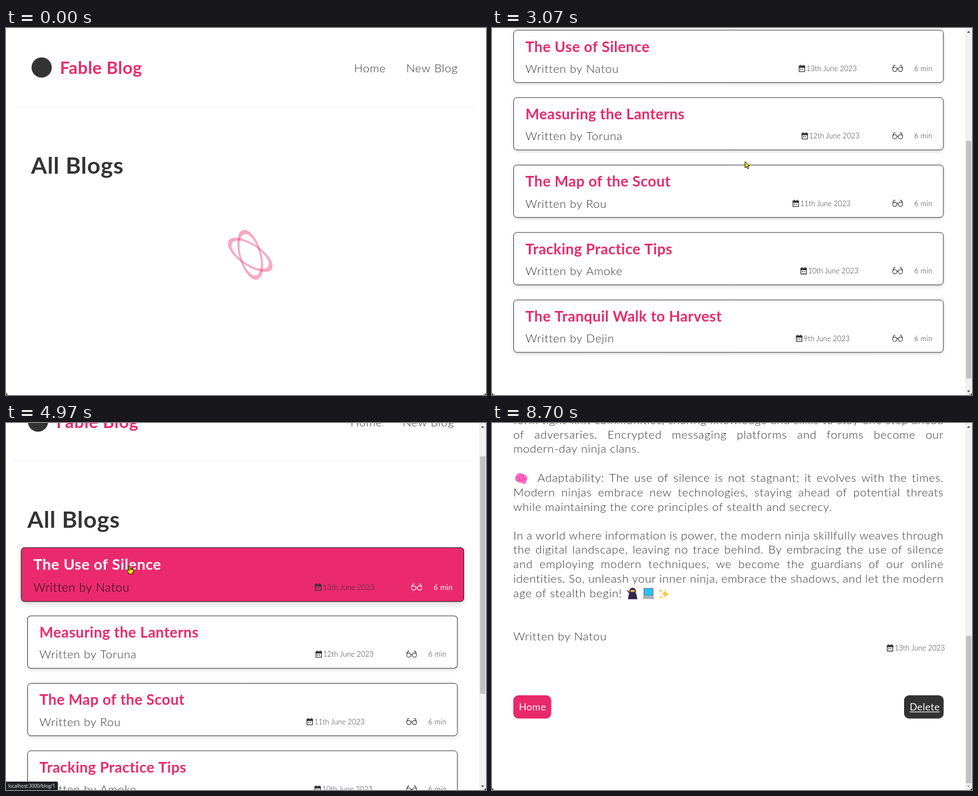
An HTML page with a canvas for the animation above (8810 ms loop, 855 by 655 pixels).

```html
<!DOCTYPE html>
<html lang="en">
<head>
<meta charset="utf-8">
<title>Blog</title>
<style>
  html, body { margin: 0; width: 100%; height: 100%; overflow: hidden; background: #fff; }
  canvas { display: block; width: 855px; height: 655px; }
</style>
</head>
<body>
<canvas id="stage"></canvas>
<script>
const W = 855, H = 655, LOOP = 8810;
const PINK = '#ea296b', DARK = '#333';
const LIST_AT = 930, CLICK_AT = 5530, DETAIL_AT = 6030;
const LIST_MAX = 320, DETAIL_MAX = 916;
const SHIFT = -6.5;               // page offset once the scrollbar takes its room
const LEFT = 38, WIDTH = 766.5;   // content column
const CARD_TOP = 296.3, CARD_H = 94.5, PITCH = 120.4, FADE = 200;

const canvas = document.getElementById('stage');
const ctx = canvas.getContext('2d');
const dpr = window.devicePixelRatio || 1;
canvas.width = W * dpr;
canvas.height = H * dpr;

const posts = [
  { title: 'The Use of Silence', author: 'Natou', date: '13th June 2023', x: 546 },
  { title: 'Measuring the Lanterns', author: 'Toruna', date: '12th June 2023', x: 551 },
  { title: 'The Map of the Scout', author: 'Rou', date: '11th June 2023', x: 535 },
  { title: 'Tracking Practice Tips', author: 'Amoke', date: '10th June 2023', x: 549 },
  { title: 'The Tranquil Walk to Harvest', author: 'Dejin', date: '9th June 2023', x: 541 }
];

// A leading * marks a line that opens with an emoji.
const article = [
  'In the quiet hours of the digital night, modern ninjas move unseen among many',
  'watchful eyes. The old lessons of patience and care have not lost their worth,',
  'and they still guide everyone who wishes to keep private matters private in an',
  'age of constant noise.',
  '',
  '*Invisibility: A light footprint is the first line of defence. Share only what',
  'is needed, close the doors that are no longer used, and let each old trace fade',
  'slowly out of sight. What cannot be found by others cannot be turned against',
  'the one who left it.',
  '',
  '*Disguise: Strong passwords and separate accounts are the masks of our time.',
  'A careful ninja never wears the same mask twice, and changes it long before it',
  'becomes familiar to those who are watching from the other side of the screen',
  'or from the street.',
  '',
  '*Awareness: Every message may hide a trap. Read slowly, look twice at every',
  'link, and trust the small doubt that tells you to wait. A calm mind notices the',
  'things that a hurried one will miss, and a short pause is often enough to stay',
  'out of harm.',
  '',
  '*Community: No ninja walks the path alone. Those who value their privacy often',
  'find each other, learn from past mistakes, stand guard for one another, and',
  'form tight-knit communities, sharing knowledge and skills to stay one step ahead',
  'of adversaries. Encrypted messaging platforms and forums become our',
  'modern-day ninja clans.',
  '',
  '*Adaptability: The use of silence is not stagnant; it evolves with the times.',
  'Modern ninjas embrace new technologies, staying ahead of potential threats',
  'while maintaining the core principles of stealth and secrecy.',
  '',
  'In a world where information is power, the modern ninja skillfully weaves through',
  'the digital landscape, leaving no trace behind. By embracing the use of silence',
  'and employing modern techniques, we become the guardians of our online',
  'identities. So, unleash your inner ninja, embrace the shadows, and let the modern',
  'age of stealth begin!'
];

// Motion: [time, values...]
const scrollList = [[1970, 0], [2430, 220], [2700, 220], [2950, 293], [4060, 293], [4450, 73]];
const scrollDetail = [[6370, 0], [6500, 300], [6770, 300], [6990, DETAIL_MAX]];
const pointer = [
  [950, 430, -20], [1680, 502, 236], [2720, 502, 236], [3420, 400, 241], [3570, 256, 434],
  [3640, 256, 434], [3800, 262, 505], [4020, 268, 505], [4200, 266, 481], [4540, 266, 481],
  [4930, 220, 254], [5650, 220, 254], [5990, 318, 275], [7430, 318, 275], [7650, 347, 340],
  [7950, 240, 520], [8300, 139, 632], [8440, 82, 662]
];
// [card, enter, leave]
const hovers = [
  [0, 2252, 2380], [1, 2380, 2850], [2, 3442, 3482], [3, 3482, 3730],
  [4, 3760, 4169], [2, 4460, 4620], [1, 4650, 4775], [0, 4795, CLICK_AT]
];
// [time, post shown in the status bubble]
const statuses = [[2470, 2], [2950, 0], [3470, 3], [3520, 4], [3800, 5], [4500, 3], [4690, 2], [4830, 1]];

const clamp = x => Math.min(1, Math.max(0, x));
const easeOut = x => 1 - Math.pow(1 - clamp(x), 2.3);
const smooth = x => x * x * (3 - 2 * x);
const inOut = x => x < .5 ? 4 * x ** 3 : 1 - 4 * (1 - x) ** 3;

function follow(keys, t, ease) {
  if (t <= keys[0][0]) return keys[0].slice(1);
  for (let i = 1; i < keys.length; i++) {
    const a = keys[i - 1], b = keys[i];
    if (t < b[0]) {
      const k = ease((t - a[0]) / (b[0] - a[0]));
      return a.slice(1).map((v, j) => v + (b[j + 1] - v) * k);
    }
  }
  return keys[keys.length - 1].slice(1);
}

function hoverState(card, t) {
  const state = { level: 0, active: false };
  for (const [c, enter, leave] of hovers) {
    if (c !== card || t < enter) continue;
    const reached = easeOut((Math.min(t, leave) - enter) / FADE);
    state.active = t < leave;
    state.level = state.active ? reached : reached * (1 - easeOut((t - leave) / FADE));
  }
  return state;
}

function setFont(size, weight, track) {
  ctx.font = `${weight} ${size}px Lato, "Open Sans", sans-serif`;
  ctx.letterSpacing = (size * track).toFixed(2) + 'px';
}

function text(str, x, y, size, weight = 300, color = DARK, track = weight > 500 ? .018 : .035) {
  setFont(size, weight, track);
  ctx.fillStyle = color;
  ctx.fillText(str, x, y);
  return ctx.measureText(str).width;
}

function fillBox(x, y, w, h, r, color) {
  ctx.fillStyle = color;
  ctx.beginPath();
  ctx.roundRect(x, y, w, h, r);
  ctx.fill();
}

function disc(x, y, rx, ry, color) {
  ctx.fillStyle = color;
  ctx.beginPath();
  ctx.ellipse(x, y, rx, ry, 0, 0, 7);
  ctx.fill();
}

function shape(points, fill, stroke) {
  ctx.beginPath();
  points.forEach(([x, y]) => ctx.lineTo(x, y));
  ctx.closePath();
  if (fill) { ctx.fillStyle = fill; ctx.fill(); }
  if (stroke) { ctx.strokeStyle = stroke; ctx.lineWidth = 1; ctx.lineJoin = 'round'; ctx.stroke(); }
}

function header(dx) {
  disc(63.5 + dx, 70.5, 18, 18, DARK);
  text('Fable Blog', 96 + dx, 82, 30.7, 700, PINK);
  text('Home', 620 + dx, 79, 20.5);
  text('New Blog', 713 + dx, 79, 20.5);
  ctx.fillStyle = '#f2f2f2';
  ctx.fillRect(19.5 + dx, 140.5, 817, 1);
}

const heading = (str, dx) => text(str, 44.5 + dx, 259.5, 41, 700);

function loader(cx, cy, p) {
  const turn = Math.PI * 2 * p;
  ctx.strokeStyle = PINK;
  ctx.globalAlpha = .4;
  ctx.lineWidth = 7.7;
  for (const [a, b] of [[turn / 2, turn], [turn, turn / 2]]) {
    ctx.save();
    ctx.translate(cx, cy);
    ctx.transform(Math.cos(b), Math.sin(a) * Math.sin(b), 0, Math.cos(a), 0, 0);
    ctx.beginPath();
    ctx.arc(0, 0, 42.2, 0, Math.PI * 2);
    ctx.stroke();
    ctx.restore();
  }
  ctx.globalAlpha = 1;
}

function calendar(x, y) {
  ctx.strokeStyle = DARK;
  ctx.lineWidth = 1.3;
  ctx.strokeRect(x + 1.2, y + 2, 9.8, 10);
  ctx.fillStyle = DARK;
  ctx.fillRect(x + .6, y + 1.6, 11, 3.6);
  ctx.fillRect(x + 2.6, y, 1.6, 3);
  ctx.fillRect(x + 8, y, 1.6, 3);
  ctx.fillRect(x + 3, y + 7, 1.8, 1.8);
  ctx.fillRect(x + 6.4, y + 7, 1.8, 1.8);
}

function glasses(x, y, color) {
  ctx.strokeStyle = color;
  ctx.lineWidth = 1.15;
  ctx.beginPath();
  for (const s of [-1, 1]) {
    ctx.moveTo(x + s * 1.2, y);
    ctx.arc(x + s * 5, y, 3.8, s < 0 ? 0 : Math.PI, s < 0 ? 6.283 : 9.425);
    ctx.moveTo(x + s * 8.8, y);
    ctx.quadraticCurveTo(x + s * 8.8, y - 4, x + s * 6.2, y - 7.4);
    ctx.lineTo(x + s * 4, y - 6.6);
  }
  ctx.moveTo(x - 1.2, y - .6);
  ctx.quadraticCurveTo(x, y - 1.8, x + 1.2, y - .6);
  ctx.stroke();
}

function card(post, top, { level, active }) {
  const cx = LEFT + WIDTH / 2, cy = top + CARD_H / 2, scale = 1 + .03 * level;
  const fading = level > .01 && !active;
  const outline = () => {
    ctx.beginPath();
    ctx.roundRect(LEFT + .5, top + .5, WIDTH - 1, CARD_H - 1, 6);
  };
  ctx.save();
  ctx.translate(cx, cy);
  ctx.scale(scale, scale);
  ctx.translate(-cx, -cy);

  ctx.save();
  ctx.shadowColor = 'rgba(0,0,0,.15)';
  ctx.shadowBlur = (6 + 5 * level) * dpr;
  ctx.shadowOffsetY = (3 + 2 * level) * dpr;
  outline();
  ctx.fillStyle = '#fff';
  ctx.fill();
  ctx.restore();

  outline();
  ctx.globalAlpha = level;
  ctx.fillStyle = PINK;
  ctx.fill();
  ctx.globalAlpha = fading ? .75 : 1;
  ctx.strokeStyle = DARK;
  ctx.lineWidth = 1 + .3 * level;
  ctx.stroke();

  const light = active ? '#fff' : DARK;
  text('Written by ' + post.author, 59.5, top + 76.5, 20.5, 300, active ? '#111' : DARK);
  calendar(post.x, top + 62.5);
  text(post.date, post.x + 14, top + 73.7, 12.8, 300, DARK, .005);
  glasses(722.5, top + 70.5, light);
  text('6 min', 752, top + 73.7, 12.8, active ? 400 : 300, light, .02);
  ctx.globalAlpha = 1;
  text(post.title, 59.5, top + 39.3, 26, 700, active ? '#fff' : PINK);
  ctx.restore();
}

function listPage(t) {
  header(SHIFT);
  heading('All Blogs', SHIFT);
  posts.forEach((post, i) => card(post, CARD_TOP + i * PITCH, hoverState(i, t)));
}

function justified(line, x, y, last) {
  if (last) return text(line, x, y, 20.5);
  setFont(20.5, 300, .035);
  const words = line.split(' ');
  const widths = words.map(w => ctx.measureText(w).width);
  const gap = (LEFT + WIDTH - x - widths.reduce((a, b) => a + b)) / (words.length - 1);
  ctx.fillStyle = DARK;
  words.forEach((w, i) => {
    ctx.fillText(w, x, y);
    x += widths[i] + gap;
  });
}

function brain(x, y) {
  disc(x, y, 11, 8, '#ff6cc4');
  disc(x - 2, y - 4, 7, 5.5, '#ff6cc4');
  disc(x + 5, y + 6, 4, 4, '#ff6cc4');
  ctx.strokeStyle = '#d6389a';
  ctx.lineWidth = 1.3;
  ctx.beginPath();
  for (const [dx, dy] of [[-5, -1], [2, -4], [5, 2], [-2, 4]]) {
    ctx.moveTo(x + dx - 3, y + dy);
    ctx.quadraticCurveTo(x + dx, y + dy - 4, x + dx + 3, y + dy + 1);
  }
  ctx.stroke();
}

function star(x, y, r) {
  ctx.fillStyle = '#fcc63f';
  ctx.beginPath();
  ctx.moveTo(x, y - r);
  for (const [px, py] of [[r, 0], [0, r], [-r, 0], [0, -r]]) {
    ctx.quadraticCurveTo(x, y, x + px, y + py);
  }
  ctx.fill();
  disc(x, y, r * .35, r * .35, '#fcc63f');
}

function closingEmoji(y) {
  shape([[242, y + 10], [244, y], [250, y - 2], [257, y], [259, y + 10]], '#32264d');
  disc(250.5, y - 4, 6, 6.5, '#32264d');
  fillBox(246.5, y - 6.5, 8, 3.5, 1.5, '#f8c13c');
  ctx.strokeStyle = '#32264d';
  ctx.lineWidth = 1.5;
  ctx.beginPath();
  ctx.moveTo(241, y - 6);
  ctx.lineTo(247, y + 2);
  ctx.stroke();

  fillBox(270, y - 10, 17.5, 14, 1, '#70727c');
  fillBox(271.2, y - 8.8, 15, 11.6, 0, '#27c2f7');
  shape([[270, y + 4], [287.5, y + 4], [289, y + 9.5], [268.5, y + 9.5]], '#a9adb8');

  star(308.5, y + .5, 9);
  star(300, y - 5, 4.5);
  star(301, y + 6, 4);
}

function button(label, x, w, y, color) {
  fillBox(x, y, w, 41.5, 9, color);
  return text(label, x + 10, y + 27, 17.6, 400, '#fff', .02);
}

function detailPage() {
  const base = DETAIL_MAX;
  header(SHIFT);
  heading(posts[0].title, SHIFT);

  let y = base + 311;
  for (let i = article.length - 1; i >= 0; i--) {
    const line = article[i], marked = line[0] === '*', end = i === article.length - 1;
    if (marked) brain(52, y - 6.5);
    if (line) justified(marked ? line.slice(1) : line, marked ? 81 : LEFT, y, !article[i + 1]);
    if (end) closingEmoji(y - 6.5);
    y -= 25.6 + (marked || end ? .9 : 0);
  }

  text('Written by ' + posts[0].author, LEFT, base + 388, 20.5);
  calendar(703, base + 395);
  text(posts[0].date, 717, base + 406.3, 12.8, 300, DARK, .005);
  button('Home', 38, 67.5, base + 486, PINK);
  const w = button('Delete', 734, 70.5, base + 486, DARK);
  ctx.fillRect(744, base + 515, w, 1.2);
}

function scrollbar(scroll, max, thumb) {
  const top = 12, room = 631 - thumb;
  ctx.fillStyle = '#f1f1f1';
  ctx.fillRect(843, 0, 12, H);
  ctx.fillStyle = '#c1c1c1';
  ctx.fillRect(844.5, top + room * scroll / max, 9.5, thumb);
  const on = '#505050', off = '#a3a3a3';
  shape([[846, 8.5], [852, 8.5], [849, 5.2]], scroll < 1 ? off : on);
  shape([[846, 647], [852, 647], [849, 650.3]], scroll > max - 1 ? off : on);
}

function statusBubble(t) {
  let id = 0;
  for (const [at, n] of statuses) if (t >= at) id = n;
  if (!id) return;
  fillBox(0, 640, 92.5, 15, [0, 3, 0, 0], '#1f2026');
  ctx.font = '8.3px "Open Sans", "Noto Sans", sans-serif';
  ctx.letterSpacing = '0px';
  ctx.fillStyle = '#fff';
  ctx.fillText('localhost:3000/blog/' + id, 4, 650.6);
}

function hand(x, y) {
  shape([[-1, 1], [0, 0], [1.2, 1], [1.4, 5], [3.2, 5], [5, 5.6], [7, 6.6], [7, 11], [5.6, 13],
    [5.6, 15.5], [-1.2, 15.5], [-1.4, 13.5], [-4.6, 9.5], [-4.2, 8], [-2.6, 8.2], [-1, 9.8]]
    .map(([px, py]) => [x + px, y + py]), '#ffee00', '#000');
  ctx.beginPath();
  for (const px of [1.4, 3.4, 5.2]) {
    ctx.moveTo(x + px, y + 5.2);
    ctx.lineTo(x + px, y + 8.4);
  }
  ctx.stroke();
}

function arrow(x, y) {
  shape([[0, 0], [0, 11], [2.6, 8.8], [4.4, 12.6], [6.2, 11.8], [4.5, 8.1], [8, 7.8]]
    .map(([px, py]) => [x + px, y + py]), '#ffee00', '#000');
}

function beam(x, y) {
  ctx.strokeStyle = '#000';
  ctx.lineWidth = 1.6;
  ctx.beginPath();
  ctx.moveTo(x, y - 6);
  ctx.lineTo(x, y + 7);
  for (const dy of [-6.5, 7.5]) {
    ctx.moveTo(x - 3.5, y + dy);
    ctx.lineTo(x + 3.5, y + dy);
  }
  ctx.stroke();
}

function drawPointer(t) {
  const [x, y] = follow(pointer, t, smooth);
  const onCard = hovers.some(([, enter, leave]) => t >= enter && t < leave);
  if (onCard) hand(x, y);
  else if (t >= DETAIL_AT && y < 318) beam(x, y);
  else arrow(x, y);
}

function scrolled(y, draw) {
  ctx.save();
  ctx.translate(0, -y);
  draw();
  ctx.restore();
}

function render(t) {
  ctx.setTransform(dpr, 0, 0, dpr, 0, 0);
  ctx.fillStyle = '#fff';
  ctx.fillRect(0, 0, W, H);

  if (t < LIST_AT) {
    header(0);
    heading('All Blogs', 0);
    loader(435, 404.7, (t + 333) / 2000);
  } else if (t < CLICK_AT) {
    const [y] = follow(scrollList, t, inOut);
    scrolled(y, () => listPage(t));
    scrollbar(y, LIST_MAX, 424);
    statusBubble(t);
  } else if (t < DETAIL_AT) {
    header(0);
    loader(435, 331, (t - CLICK_AT) / 2000);
  } else {
    const [y] = follow(scrollDetail, t, inOut);
    scrolled(y, detailPage);
    scrollbar(y, DETAIL_MAX, 263);
  }
  drawPointer(t);

  // rounded lower corners of the window
  ctx.fillStyle = '#222';
  ctx.beginPath();
  ctx.rect(0, 0, W, H);
  ctx.roundRect(0, -20, W, H + 20, 5);
  ctx.fill('evenodd');
}

const start = performance.now();
function tick() {
  render((performance.now() - start) % LOOP);
  requestAnimationFrame(tick);
}
tick();
</script>
</body>
</html>
```
